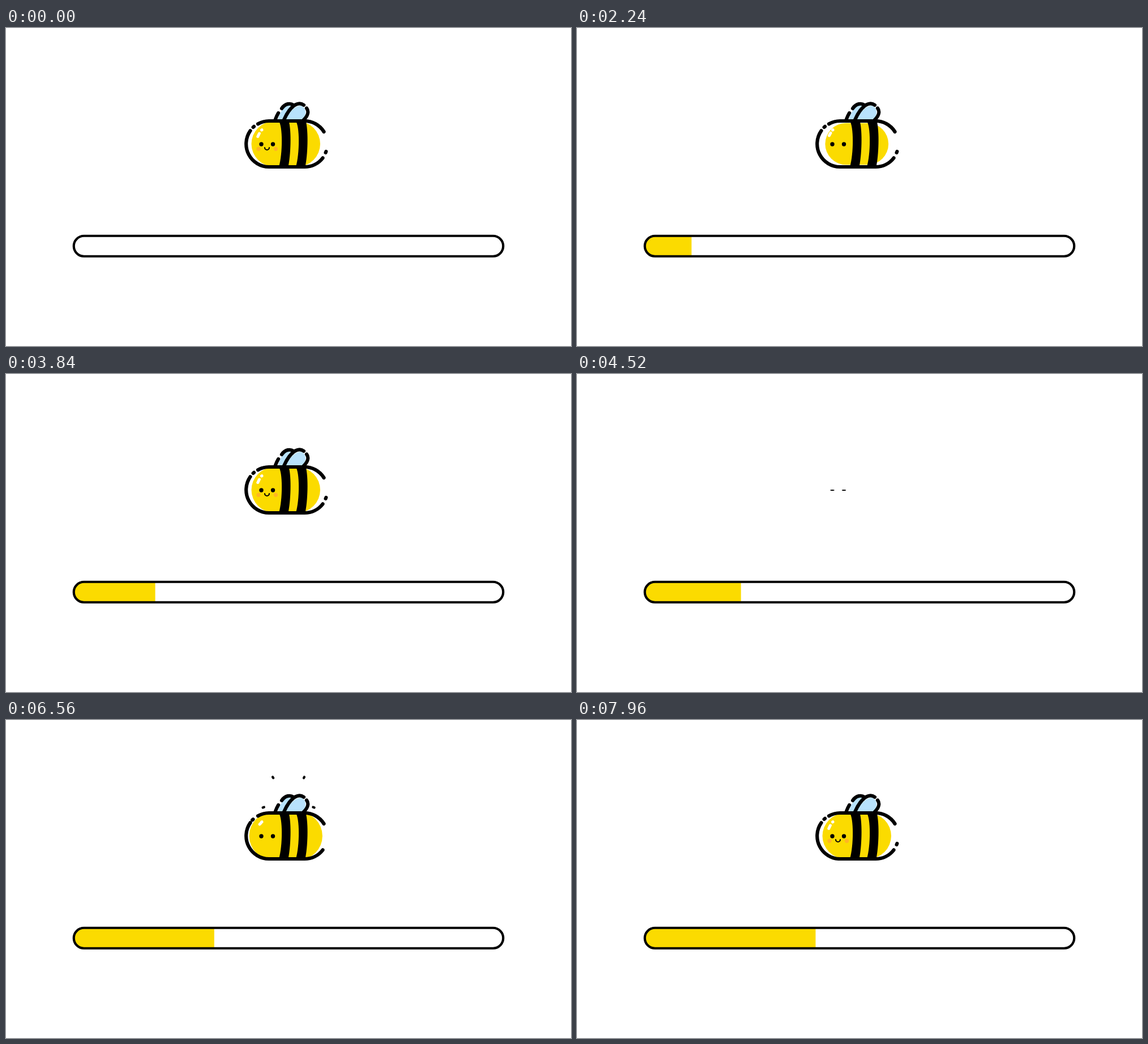
Write an HTML page that moves like this. It is 998x561 px and loops after 8 s.

```html
<!DOCTYPE html>
<html lang="en">
<head>
<meta charset="utf-8">
<title>Bee loader</title>
<style>
  html, body { margin: 0; width: 100%; height: 100%; overflow: hidden; background: #fff; }
  svg { display: block; width: 998px; height: 561px; }
  .line { fill: none; stroke: #000; stroke-width: 6.2; stroke-linecap: round; stroke-linejoin: round; }
  .spark { stroke-width: 4.2; }
  .shine { fill: none; stroke: #fff; stroke-width: 5; stroke-linecap: round; }
  .sun { fill: #fbdb00; }
  .sky { fill: #b8e2fc; }
  .blush { fill: #ffb524; }
</style>
</head>
<body>
<svg viewBox="0 0 998 561">
  <defs>
    <clipPath id="barClip"><rect x="119.75" y="366.75" width="758.5" height="36" rx="18"/></clipPath>
    <path id="stripe" d="M481.5 164C489 172 489 222 482 245H498.500C503 225 504.500 182 499.500 164Z"/>
  </defs>

  <g id="bee">
    <g id="wings">
      <path class="sky" d="M480 163C483 150 489 139 500 135.500L508 137L494 163Z"/>
      <path class="line" d="M475.500 162Q478 155 481 150M487 142C493 133 502 132 508 136"/>
      <path class="sky" d="M493 163C499 149 510 138 520 137C531 139 531 152 525 163Z"/>
      <path class="line" d="M491 162C497 148 505 139 511 135.500Q519 131 526 136M531 141.500C536 148 532 156 526 162"/>
    </g>
    <rect id="body" class="sun" x="433.500" y="164.500" width="121.500" height="80" rx="40"/>
    <g id="stripes">
      <use href="#stripe"/>
      <use href="#stripe" x="30"/>
    </g>
    <path class="line draw" pathLength="1" d="M445 169.200A40.500 40.500 0 0 1 464.500 164H527A40.500 40.500 0 0 1 561.500 183"/>
    <path class="line draw" pathLength="1" d="M431.500 181.300A40.500 40.500 0 0 0 464.500 245H527A40.500 40.500 0 0 0 559.500 229.300"/>
    <path id="dotLeft" class="line" d="M436.600 175L438 173.800"/>
    <path id="dotRight" class="line" d="M565.300 218L564.600 219.800"/>
    <g id="shine">
      <path class="shine" d="M451.500 180L452 179.700"/>
      <line id="shineTail" class="shine"/>
    </g>
    <circle class="cheek blush" cx="446" cy="213.300" r="3.600"/>
    <circle class="cheek blush" cx="476.500" cy="213.300" r="3.600"/>
    <path id="mouth" class="line" style="stroke-width:2.1" d="M457 211A4 4 0 0 0 465 211" pathLength="1"/>
  </g>

  <g id="sparks">
    <path class="line spark" d="M471 100.500L472.200 102.300"/>
    <path class="line spark" d="M527 100.500L526 102.300"/>
    <path class="line spark" d="M453.600 154.500L455.800 153.700"/>
    <path class="line spark" d="M544.600 154.500L542.400 153.700"/>
  </g>

  <g id="eyes">
    <circle class="eye" cx="451" cy="205" r="3.700"/>
    <circle class="eye" cx="471.500" cy="205" r="3.700"/>
  </g>

  <rect id="fill" class="sun" x="119" y="366" height="37" clip-path="url(#barClip)"/>
  <rect x="119.75" y="366.75" width="758.5" height="36" rx="18" fill="none" stroke="#000" stroke-width="4.200"/>
</svg>

<script>
const LOOP = 8000, CYCLE = 4400, CUT = 80, STEP = 40;
const $ = id => document.getElementById(id);
const all = selector => document.querySelectorAll(selector);
const mix = (a, b, k) => a + (b - a) * k;

// Eased interpolation between [time, value] keys.
function track(time, ...keys) {
  if (time <= keys[0][0]) return keys[0][1];
  for (let i = 1; i < keys.length; i++) {
    const [t0, v0] = keys[i - 1], [t1, v1] = keys[i];
    if (time <= t1) {
      const k = (time - t0) / (t1 - t0);
      return mix(v0, v1, k * k * (3 - 2 * k));
    }
  }
  return keys[keys.length - 1][1];
}
const ramp = (time, from, to) => track(time, [from, 0], [to, 1]);

const show = (el, on) => el.setAttribute("visibility", on ? "visible" : "hidden");

function scale(el, cx, cy, sx, sy = sx) {
  show(el, sx > 0 && sy > 0);
  el.setAttribute("transform", `translate(${cx} ${cy}) scale(${sx} ${sy}) translate(${-cx} ${-cy})`);
}
const scaleCircle = (el, sx, sy) =>
  scale(el, +el.getAttribute("cx"), +el.getAttribute("cy"), sx, sy);

function trim(el, from, to) {
  show(el, to > from);
  el.style.strokeDasharray = `${to - from} 3`;
  el.style.strokeDashoffset = -from;
}

function drawEyes(q) {
  const open = track(q, [0, 0], [40, .28], [160, 1]);
  const dx = track(q, [800, 0], [1000, -2], [1320, -2], [1480, 0]);
  const dy = track(q, [800, 0], [1000, -6], [1400, -6], [1600, -12], [1720, 0]);
  $("eyes").setAttribute("transform", `translate(${dx} ${dy})`);
  all(".eye").forEach(el => scaleCircle(el, 1, open));
}

function drawBee(q) {
  scale($("body"), 494.5, 204.5,
    track(q, [1680, 0], [2000, .9], [2080, 1.065], [2160, .92], [2240, 1.03], [2320, 1]));
  all(".draw").forEach(el => trim(el, 0, ramp(q, 1680, 1960)));
  scale($("stripes"), 507, 204.5, 1, ramp(q, 1800, 1960));
  scale($("wings"), 502, 163, ramp(q, 1880, 2040));

  show($("dotLeft"), q >= 1960);
  $("dotLeft").setAttribute("transform", `rotate(${mix(-3, 0, ramp(q, 2080, 2160))} 464.5 204.5)`);
  scale($("dotRight"), 565, 219, ramp(q, 2080, 2160));

  const slide = ramp(q, 2060, 2200), tail = $("shineTail");
  show($("shine"), q >= 2040);
  tail.setAttribute("x1", mix(450.5, 447.4, slide));
  tail.setAttribute("y1", mix(181.5, 186, slide));
  tail.setAttribute("x2", mix(448.2, 444.8, slide));
  tail.setAttribute("y2", mix(183.5, 191.5, slide));

  const smile = track(q, [2960, 0], [3000, .12], [3200, 1]) / 2;
  trim($("mouth"), .5 - smile, .5 + smile);
  all(".cheek").forEach(el => scaleCircle(el, ramp(q, 3100, 3360)));
}

function drawSparks(q) {
  show($("sparks"), q > 1900 && q < 2120);
  const out = ramp(q, 1900, 2080);
  [[7, 11], [-9, 11], [9, -3], [-9, -3]].forEach(([dx, dy], i) =>
    $("sparks").children[i].setAttribute("transform", `translate(${dx * (1 - out)} ${dy * (1 - out)})`));
}

function render(time) {
  const t = Math.floor(time % LOOP / STEP) * STEP;
  const q = (t - CUT + CYCLE) % CYCLE;
  drawEyes(q);
  drawBee(q);
  drawSparks(q);
  $("fill").setAttribute("width", Math.max(0, 116.5 + t * .03831 - 119));
}

const start = performance.now();
function tick() {
  render(performance.now() - start);
  requestAnimationFrame(tick);
}
tick();
</script>
</body>
</html>
```
